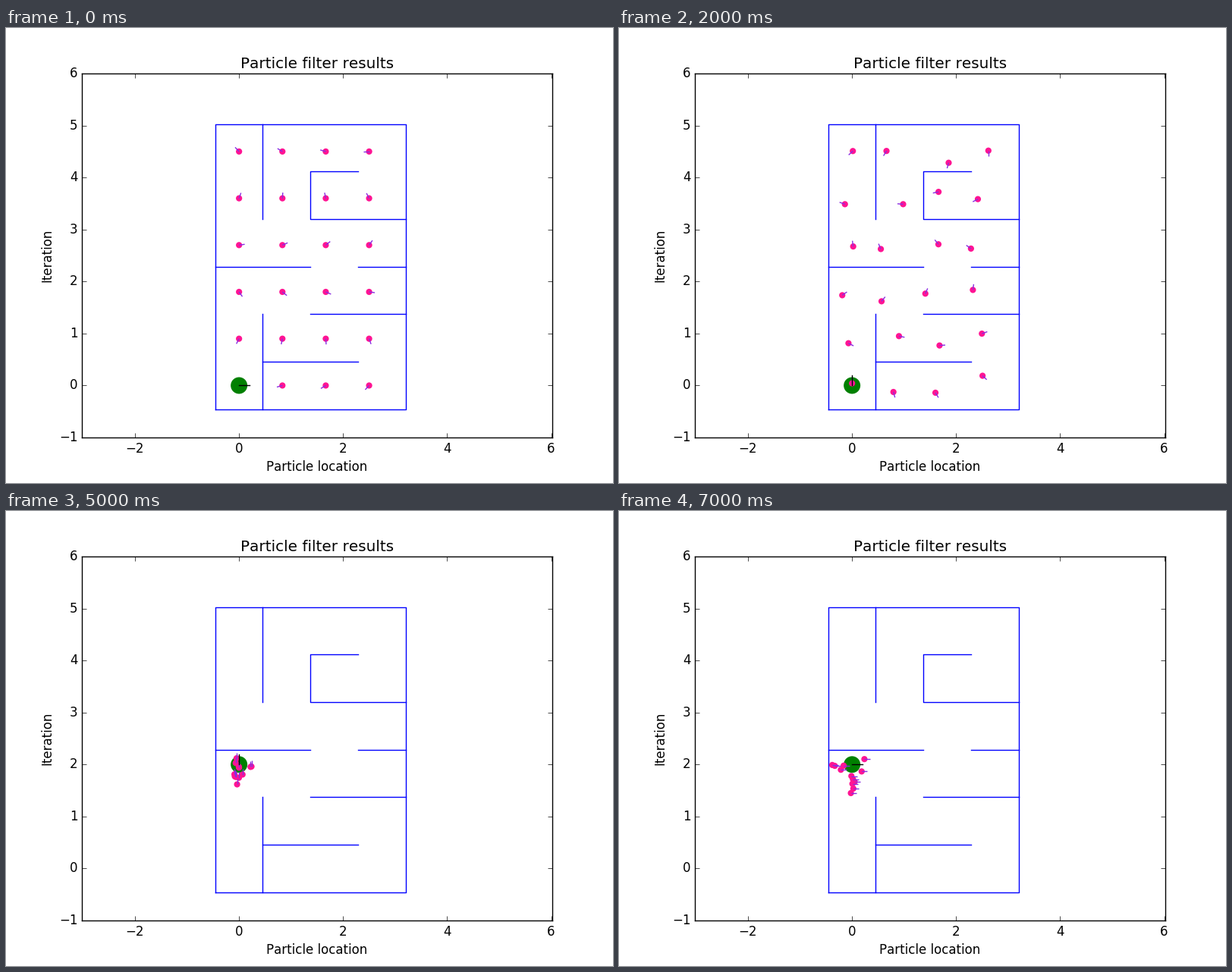
Write a matplotlib script that moves like this. It is 800x600 px and loops after 8 s.

```python
import numpy as np
import matplotlib.pyplot as plt
from matplotlib.animation import FuncAnimation
from matplotlib.collections import LineCollection
from matplotlib.patches import Circle

plt.style.use("classic")
plt.rcParams.update({"font.family": "DejaVu Sans", "text.kerning_factor": 6})

CELL = 0.9144
ROWS, COLS = 6, 4
UNIT = 480 / 7  # pixels per data unit

# Wall paths through cell corners
WALLS = [
    [(0, 0), (4, 0), (4, 6), (0, 6), (0, 0)],
    [(1, 4), (1, 6)],
    [(3, 5), (2, 5), (2, 4), (4, 4)],
    [(0, 3), (2, 3)],
    [(3, 3), (4, 3)],
    [(2, 2), (4, 2)],
    [(1, 0), (1, 2)],
    [(1, 1), (3, 1)],
]

rng = np.random.default_rng(7)


def jitter(points, sigma):
    noise = rng.normal(0, sigma, np.shape(points))
    return points + noise.clip(-2 * sigma, 2 * sigma)


def direction(degrees):
    a = np.radians(degrees)
    return np.column_stack([np.cos(a), np.sin(a)])


def needles(points, degrees, length):
    return np.stack([points, points + length * direction(degrees)], axis=1)


def swarm(row, heading, count=12):
    """Resampled particles, gathered just below the robot."""
    centers = np.tile([0, row - 0.17], (count, 1))
    return jitter(centers, 0.19), np.full(count, heading)


def simulate():
    """Robot row, robot heading, particle places and headings per step."""
    grid = np.array([(2.5 / 3 * c, 0.9 * r)
                     for r in range(ROWS) for c in range(COLS)])
    turn = np.linspace(180, 540, ROWS * COLS)
    turn[0] = 0  # this one starts hidden under the robot

    north = turn + 90
    drifted = jitter(grid, 0.14)
    near_one = swarm(1, 90)
    near_two = swarm(2, 90)

    # Survivors of the scattered particles, one unit further on
    parents = np.array([14] * 6 + [12, 5, 6])
    strays = jitter((grid + direction(north))[parents], 0.14)
    mixed = (np.vstack([near_one[0], strays]),
             np.concatenate([near_one[1], north[parents]]))

    return [
        (0, 0, (grid[1:], turn[1:])),
        (0, 90, (grid[1:], north[1:])),
        (0, 90, (drifted, north)),
        (1, 90, near_one),
        (1, 90, mixed),
        (2, 90, near_two),
        (2, 90, near_two),
        (2, 0, swarm(2, 0)),
    ]


steps = simulate()

fig = plt.figure(figsize=(8, 6), dpi=100, facecolor="white")
ax = fig.add_axes([0.125, 0.1, 0.775, 0.8])
half = 310 / UNIT
ax.set_xlim(1.5 - half, 1.5 + half)
ax.set_ylim(-1, 6)
ax.set_xticks(range(-2, 7, 2))
ax.set_yticks(range(-1, 7))
ax.set_title("Particle filter results")
ax.set_xlabel("Particle location")
ax.set_ylabel("Iteration")

for path in WALLS:
    ax.plot(*((np.array(path) - 0.5) * CELL).T, "b-", lw=1)

robot = ax.add_patch(Circle((0, 0), 0.15, fc="green", ec="green", zorder=3))
pointer, = ax.plot([], [], "k-", lw=1, zorder=6)
dots = ax.scatter([], [], s=35, c="deeppink", edgecolors="none", zorder=4)
ticks = ax.add_collection(
    LineCollection([], colors="blueviolet", linewidths=1, zorder=5),
    autolim=False)


def draw(i):
    row, heading, (points, degrees) = steps[i]
    robot.center = 0, row
    pointer.set_data(*needles(np.array([[0, row]]), heading, 0.2)[0].T)
    dots.set_offsets(points)
    ticks.set_segments(needles(points, degrees, 0.11))
    return robot, pointer, dots, ticks


anim = FuncAnimation(fig, draw, frames=len(steps), interval=1000,
                     repeat=True, repeat_delay=0)
plt.show()
```
